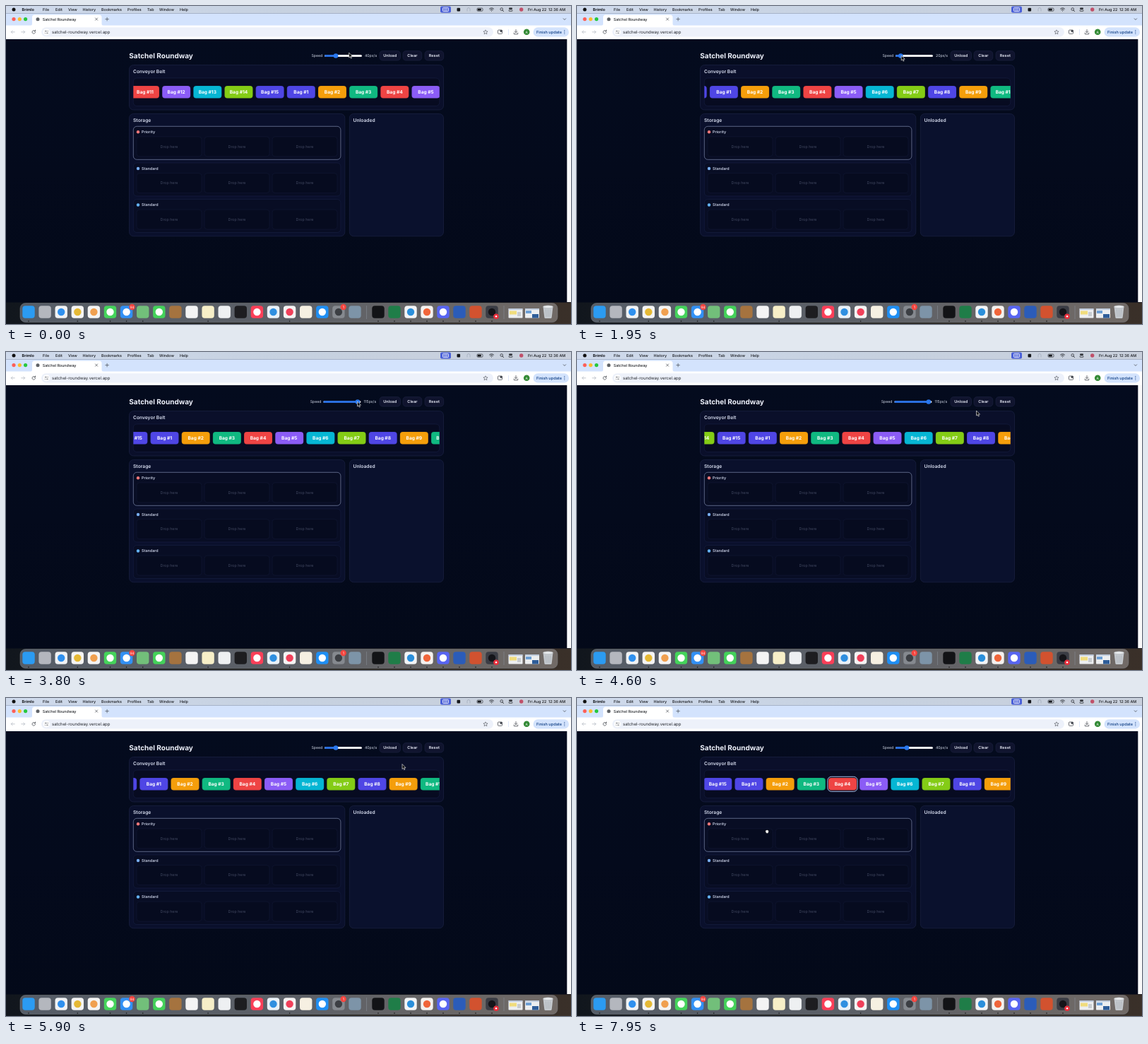
An HTML page for the animation above (8000 ms loop, 800x450 px).

```html
<!DOCTYPE html>
<html lang="en">
<head>
<meta charset="utf-8">
<title>Satchel Roundway</title>
<style>
html, body { margin: 0; width: 100%; height: 100%; overflow: hidden; background: #040a1c; }
svg { display: block; width: 100vw; height: 100vh; }
text { font-family: Inter, "Open Sans", sans-serif; text-rendering: geometricPrecision; }
</style>
</head>
<body>
<svg id="stage" viewBox="0 0 800 450"></svg>
<script>
const LOOP = 8000, PITCH = 106 / 2.4, BAGS = 15, SCALE = 1 / 2.4;
const stage = document.getElementById('stage');

const rect = (x, y, w, h, r, fill, more = '') =>
  `<rect x="${x}" y="${y}" width="${w}" height="${h}" rx="${r}" fill="${fill}" ${more}/>`;
const dot = (x, y, r, fill, more = '') => `<circle cx="${x}" cy="${y}" r="${r}" fill="${fill}" ${more}/>`;
const line = (d, color, width = 0.8) =>
  `<path d="${d}" fill="none" stroke="${color}" stroke-width="${width}" stroke-linecap="round" stroke-linejoin="round"/>`;
const label = (x, y, size, fill, str, weight = 400, more = '') =>
  `<text x="${x}" y="${y}" font-size="${size}" fill="${fill}" font-weight="${weight}" ${more}>${str}</text>`;
const centered = 'text-anchor="middle"';
const edge = (color, width = 0.6) => `stroke="${color}" stroke-width="${width}"`;

function menuBar() {
  const menus = [[52, 'File'], [70, 'Edit'], [88, 'View'], [108.5, 'History'], [135, 'Bookmarks'],
    [172, 'Profiles'], [200, 'Tab'], [217, 'Window'], [246, 'Help']];
  const ink = '#16181d';
  return rect(0, 0, 800, 10.6, 0, 'url(#menu)') +
    dot(11, 5, 2.5, '#111') +
    label(22.5, 7, 5.5, ink, 'Brimlo', 700) +
    menus.map(([x, s]) => label(x, 7, 5.4, ink, s, 500)).join('') +
    rect(615, 0.5, 15, 9, 2, '#4a60d8') + rect(618.5, 2.3, 8, 5.3, 1, 'none', edge('#fff', 0.8)) +
    line('M620 4h5M620 6h5', '#fff', 0.7) +
    rect(638.5, 2.8, 4.6, 4.6, 1, ink) +
    line('M653 7V4.5a2 2 0 0 1 4 0V7', '#a3acbb') +
    rect(667, 3, 8, 4.2, 1.2, 'none', edge(ink, 0.6)) + rect(667.8, 3.8, 5, 2.6, 0.6, ink) +
    line('M684.5 4a4.2 4.2 0 0 1 6 0M685.8 5.5a2.4 2.4 0 0 1 3.4 0M687.5 7v.1', ink, 0.9) +
    dot(701.7, 4.5, 1.8, 'none', edge(ink, 0.7)) + line('M703 6l1.5 1.6', ink) +
    rect(712, 2.5, 5, 2.1, 1, ink) + rect(712, 5.4, 5, 2.1, 1, 'none', edge(ink, 0.6)) +
    dot(729.7, 5, 2.7, '#c0506a') +
    label(739, 7, 5.4, ink, 'Fri Aug 22', 500) + label(768, 7, 5.4, ink, '12:36 AM', 500);
}

function browserBar() {
  const ink = '#474b52', pale = '#b6bbc4';
  return rect(0, 10.5, 800, 20, 0, '#d3e3fd') +
    ['#fe5f57', '#febc2e', '#28c840'].map((c, i) => dot(11 + i * 8.3, 18.6, 2.6, c)).join('') +
    `<path d="M34 28q3 0 3-3v-9q0-3.5 3.500-3.500h91.500q3.500 0 3.500 3.500v9q0 3 3 3z" fill="#fff"/>` +
    dot(45, 18.7, 2.5, '#5f6368') +
    label(51.8, 20.7, 5.4, '#1f2227', 'Satchel Roundway', 500) +
    line('M126.500 17l3.200 3.200m0-3.200l-3.200 3.200M140.800 18.600h4.600M143.100 16.300v4.600', ink, 0.7) +
    line('M789.200 17.800l1.700 1.700 1.700-1.700', ink, 0.8) +
    rect(0, 27.5, 800, 19.5, 0, '#fff') +
    line('M12.300 36.800h-5m2-2l-2 2 2 2M21.700 36.800h5m-2-2l2 2-2 2', pale, 0.8) +
    line('M41.300 35.600a2.300 2.300 0 1 0 .3 1.700M41.500 34v1.800h-1.800', ink, 0.8) +
    rect(50, 30.2, 640, 13.2, 6.6, '#edf1fa') + dot(57.3, 36.8, 4.6, '#fff') +
    line('M55.300 35.500h2m1.800 0h.3M55.300 38.200h.3m1.800 0h2', ink, 0.8) +
    label(65, 38.9, 6, '#202329', 'satchel-roundway.vercel.app') +
    `<path d="M679 33.800l.9 2 2.200.2-1.700 1.500.5 2.200-1.900-1.200-1.900 1.200.5-2.200-1.700-1.500 2.200-.2z" fill="none" ${edge(ink, 0.6)}/>` +
    rect(696.5, 34, 6, 5.3, 0.8, 'none', edge(ink, 0.8)) + rect(699.5, 34, 3, 2.8, 0, ink) +
    rect(711, 33, 0.6, 8, 0, '#c9d8f5') +
    line('M722 33.500v4m-1.800-1.700l1.800 1.800 1.800-1.800M719.300 38v1.800h5.400V38', ink, 0.8) +
    dot(737.2, 36.8, 4.3, '#338a35') + label(737.2, 38.6, 4.8, '#fff', 'A', 400, centered) +
    rect(746.5, 30.3, 50.5, 13.2, 6.6, '#d3e3fd') +
    label(751, 38.8, 5.6, '#0b3b80', 'Finish update', 500) +
    [34.6, 36.8, 39].map(y => dot(790.8, y, 0.6, '#0b3b80')).join('');
}

function button(x, w, str) {
  return rect(x, 63.6, w, 13.4, 4.2, '#10142e', edge('#1f2645')) +
    label(x + w / 2, 72.2, 5.5, '#e9ecf8', str, 600, centered);
}

function storageRow(y, name, color, border) {
  let out = rect(180.3, y, 293.6, 47, 5, '#080d24', border) +
    dot(187, y + 8, 2.2, color) + label(192, y + 9.9, 5.4, '#c6cde2', name, 600);
  for (let i = 0; i < 3; i++) {
    const x = 185 + i * 96;
    out += rect(x, y + 14.6, 92, 28, 4, '#060b1f', edge('#141a36')) +
      label(x + 46, y + 30.4, 5.3, '#434a63', 'Drop here', 400, centered);
  }
  return out;
}

function page() {
  const panel = edge('#1c2344', 0.7), plain = edge('#182044');
  return rect(0, 46.5, 800, 374, 0, 'url(#night)') +
    rect(794.3, 47, 5.7, 372, 0, '#fafafa') +
    label(174.3, 74.2, 10, '#eef1fb', 'Satchel Roundway', 700) +
    button(529, 29.5, 'Unload') + button(562, 26.8, 'Clear') + button(593, 26.7, 'Reset') +
    rect(174.5, 83.5, 445, 63.5, 6, '#0a0f2a', panel) +
    label(180, 95.4, 6.7, '#d8def0', 'Conveyor Belt', 600) +
    rect(180.2, 102, 433.6, 39.5, 5, '#070b21', edge('#192044')) +
    rect(174.5, 152.5, 305.3, 173.3, 6, '#0a102c', panel) +
    label(180, 163.8, 6.7, '#d8def0', 'Storage', 600) +
    rect(486.3, 152.5, 133.2, 173.3, 6, '#0a112d', panel) +
    label(491.6, 163.8, 6.7, '#d8def0', 'Unloaded', 600) +
    storageRow(170.3, 'Priority', '#f0787a', edge('#7d89ab', 0.7)) +
    storageRow(222, 'Standard', '#78aef5', plain) +
    storageRow(273.5, 'Standard', '#63b2f7', plain);
}

function dock() {
  // each tile, and where it carries a symbol, the colour of a plain disc
  const left = ['#2b9bf2', '#b4b7be', '#f0f2f4 #2f90ee', '#f4f4f4 #e5b935', '#f4f4f4 #f0a050', '#45d35b #fff',
    '#3290f4 #fff', '#72bf7a', '#44d15a #fff', '#a5733f', '#f4f4f4', '#f7efc8', '#eef0f2', '#1d1d20',
    '#fa3f58 #fff', '#e9f1f8 #2f8fe0', '#f5f3f3 #f0405a', '#f6f0e2', '#1f8ff4 #fff', '#85898f #3c3f44', '#7d94a8'];
  const right = ['#121316', '#1f7d48', '#f2f4f6 #2b8fdb', '#f4f1ef #f0653a', '#5865f2 #fff', '#2b5cb9',
    '#d2522f', '#3a3c44 #141419'];
  const running = [0, 3, 5, 6, 7, 11, 16];
  const icon = (x, colors) => {
    const [tile, mark] = colors.split(' ');
    return rect(x - 8.7, 424.3, 17.4, 17.4, 4, tile) + (mark ? dot(x, 433, 5.2, mark) : '');
  };
  const thumb = x => rect(x - 10, 428, 20, 13.5, 0.8, '#eceef0') + rect(x - 10, 428, 20, 2, 0.8, '#bfcbdc');
  return rect(0, 419.5, 800, 30.5, 0, 'url(#desk)') +
    rect(20, 420.5, 761, 27, 7.5, 'url(#glass)', edge('#7a7e85', 0.5)) +
    left.map((c, i) => icon(32 + i * 23.1, c)).join('') +
    right.map((c, i) => icon(527 + i * 23, c)).join('') +
    running.map(i => dot(32 + i * 23.1, 446, 0.8, '#111')).join('') +
    right.map((c, i) => dot(527 + i * 23, 446, 0.8, '#111')).join('') +
    rect(510.3, 424, 0.6, 19, 0, '#858b94') + rect(704.7, 424, 0.6, 19, 0, '#858b94') +
    dot(178.5, 426, 4.2, '#f4443e') + label(178.5, 427.7, 4.5, '#fff', '94', 400, centered) +
    dot(477.7, 426, 4.2, '#f4443e') + label(477.7, 427.8, 5, '#fff', '1', 400, centered) +
    dot(694, 439.3, 3.8, '#e92f3c') + dot(694, 439.3, 1.2, '#fff') +
    thumb(721.5) + rect(713, 431.5, 10, 5, 0, '#f0dc7c') + rect(724, 433, 5, 6, 0, '#c8ccd0') +
    thumb(745) + rect(736, 431, 8, 4, 0, '#6d9fd4') + rect(745, 436, 9, 5.5, 0, '#2f5e99') +
    `<path d="M760.500 425.500h14l-1.800 15q-.2 1.500-1.500 1.500h-7.400q-1.300 0-1.500-1.500z" fill="#c3c8cd"/>` +
    `<ellipse cx="767.500" cy="425.700" rx="7" ry="1.900" fill="#e8ebed" ${edge('#a9afb5', 0.5)}/>` +
    line('M764.500 430l.6 9M767.500 430v9M770.500 430l-.6 9', '#a0a7ae', 0.5);
}

const BAG_COLORS = ['#4f46e5', '#f59e0b', '#10b981', '#ef4444', '#8b5cf6', '#06b6d4', '#84cc16'];

function bag(n) {
  const ring = n === 4 ? rect(-1.4, 111.3, 42.4, 21, 5.4, '#0a1024', edge('#b9cffa', 0.9) + ' id="ring"') : '';
  return `<g class="bag">${ring}${rect(-0.2, 113, 40, 17.5, 4, BAG_COLORS[(n - 1) % 7])}` +
    rect(0, 113.2, 39.6, 17.1, 3.8, 'none', edge('rgba(0,0,0,.18)', 0.4)) +
    label(19.8, 124.2, 6.6, '#fff', 'Bag #' + n, 700, centered) + '</g>';
}

const gradient = (id, stops, direction = '') => `<linearGradient id="${id}" ${direction}>` +
  stops.map((c, i) => `<stop offset="${i / (stops.length - 1)}" stop-color="${c}"/>`).join('') + '</linearGradient>';

stage.innerHTML = '<defs>' +
  gradient('night', ['#040b1e', '#040a1c', '#030919'], 'x2="0" y2="1"') +
  gradient('menu', ['#cfdaec', '#c6d1e0', '#c9d0dc']) +
  gradient('desk', ['#11161d', '#2a2a28', '#3a3029']) +
  gradient('glass', ['#565d67', '#5c6067', '#716a66']) +
  '<clipPath id="belt"><rect x="180.300" y="102" width="433.500" height="39.500"/></clipPath></defs>' +
  page() + menuBar() + browserBar() + dock() +
  `<g clip-path="url(#belt)">${Array.from({ length: BAGS }, (_, i) => bag(i + 1)).join('')}</g>` +
  `<g id="slider">${label(432.4, 72.2, 5.2, '#d5dbea', 'Speed')}${rect(451, 68.9, 53, 3.2, 1.6, '#efefef')}` +
  `${rect(451, 68.9, 10, 3.2, 1.6, '#2a6fe0', 'id="fill"')}${dot(0, 70.5, 3.3, '#2a78ee', 'id="thumb"')}</g>` +
  label(508, 72.2, 5.2, '#d5dbea', '', 400, 'id="speed"') +
  `<g id="cursor"><path id="arrow" d="M0 0V7l1.600-1.400 1.100 2.500 1.200-.5-1.100-2.400H5z" fill="#0a0a0a" stroke="#fff" stroke-width=".6"/>` +
  `<path id="hand" d="M-2 .2Q-2-1.800-.5-1.600Q.5-2.300 1.300-1.500Q2.600-1.600 2.500 0Q2.700 2.800.4 2.900Q-1.500 2.900-2 .2Z" fill="#fff" stroke="#111" stroke-width=".4"/></g>`;

// start time, belt speed in page px/s, where bag 1 sits at that moment
const PHASES = [[0, 40, 398], [302, 85, 182.5], [1280, 20, 182.5], [3337, 115, 182.5], [5480, 40, 182.5]];
const GRAB = 7400;
// time, x, y
const PATH = [[0, 485.6, 66], [250, 485.8, 69.5], [600, 485.8, 69.5], [1050, 473, 69], [1250, 458.5, 70],
  [1900, 459, 70], [2900, 490, 69], [3300, 497.5, 70], [3800, 497.5, 70], [4600, 565.5, 83],
  [5300, 604, 69], [5500, 604, 69], [5900, 561, 93.5], [6800, 276.8, 136], [7300, 358, 122],
  [GRAB, 361, 122], [7950, 268.8, 188.6], [LOOP, 268, 189]];

const $ = id => document.getElementById(id);
const [slider, fill, thumb, speedText, cursor, arrow, hand, ring] =
  ['slider', 'fill', 'thumb', 'speed', 'cursor', 'arrow', 'hand', 'ring'].map($);
const bags = [...document.querySelectorAll('.bag')];
const show = (el, on) => el.setAttribute('visibility', on ? 'visible' : 'hidden');

function cursorAt(t) {
  const i = PATH.findIndex(p => p[0] > t);
  const [t0, x0, y0] = PATH[i - 1], [t1, x1, y1] = PATH[i];
  const u = (t - t0) / (t1 - t0), k = u * u * (3 - 2 * u);
  return [x0 + (x1 - x0) * k, y0 + (y1 - y0) * k];
}

function draw(t) {
  const [start, speed, origin] = PHASES.filter(p => p[0] <= t).pop();
  const first = origin + (t - start) / 1000 * speed * SCALE;
  const length = BAGS * PITCH;
  bags.forEach((el, i) => {
    const x = (first + i * PITCH - 135) % length + 135;
    el.setAttribute('transform', `translate(${x.toFixed(2)})`);
  });

  const shift = speed > 99 ? -1.6 : 0;
  const knob = 467 + (speed - 40) * 0.433;
  slider.setAttribute('transform', `translate(${shift})`);
  fill.setAttribute('width', knob - 451);
  thumb.setAttribute('cx', knob);
  speedText.setAttribute('x', 508 + shift);
  speedText.textContent = speed + 'px/s';

  const held = t >= GRAB;
  show(ring, held);
  show(hand, held);
  show(arrow, !held);
  cursor.setAttribute('transform', `translate(${cursorAt(t)})`);
}

const began = performance.now();
function tick() {
  draw((performance.now() - began) % LOOP);
  requestAnimationFrame(tick);
}
tick();
</script>
</body>
</html>
```
